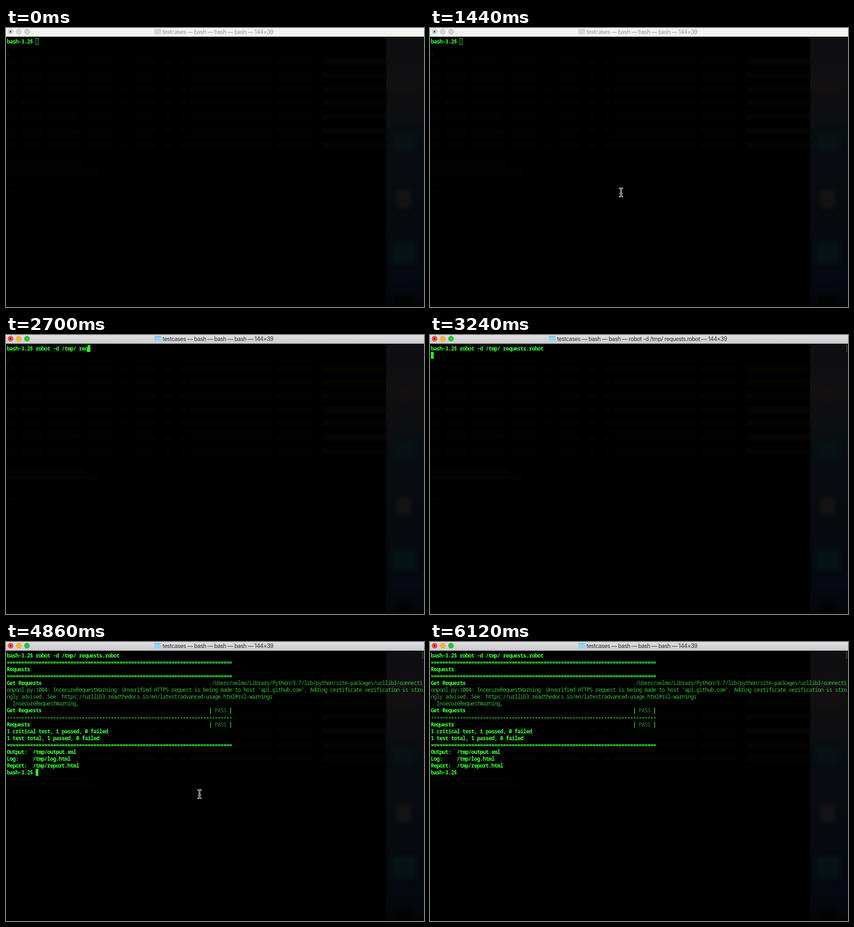
An HTML page for the animation above (6.21 s loop, 917x611 px).

```html
<!DOCTYPE html>
<html lang="en">
<head>
<meta charset="utf-8">
<title>Terminal session</title>
<style>
  html, body { margin: 0; width: 100%; height: 100%; overflow: hidden; background: #000; }
  #stage { position: relative; width: 917px; height: 611px; overflow: hidden; background: #000; }
  #stage * { position: absolute; box-sizing: border-box; }

  #bar { left: 0; top: 0; width: 917px; height: 19px; background: #f3f5ef; color: #96969a; }
  .active #bar { background: linear-gradient(#e0dfe2, #cacacc); color: #2d2d31; }
  #heading { left: 456px; top: 0; height: 17px; display: flex; gap: 3px; transform: translateX(-50%); }
  #stage #heading * { position: static; }
  #title { white-space: pre; font: 12.4px/17px Inter, "Liberation Sans", sans-serif; letter-spacing: -.53px; }
  #folder { margin-top: 2px; width: 15px; height: 12px; border-radius: 1px; background: #d5d7d3; }
  .active #folder { background: linear-gradient(#83c5e2 25%, #97d3ec 25%); }
  .light { top: 2px; width: 11.5px; height: 11.5px; border-radius: 50%; background: #d2d3d2; border: 1px solid #c2c3c2; }
  .active .light { background: var(--on); border-color: var(--rim); }
  #dot { left: 8px; top: 6px; width: 4px; height: 4px; border-radius: 50%; background: #4a4a4c; }
  .active #dot { background: #5c0906; }

  #side { left: 834px; top: 19px; width: 83px; height: 592px;
    background: linear-gradient(#0f0f12, #100f12 18%, #0d0e11 30%, #080d11 37%, #080b0f 50%, #070a0e 70%, #050910 90%, #040609); }
  .smudge { border-radius: 2px; filter: blur(1.5px); }
  .tile { filter: blur(4px); }

  #term { left: 1.7px; top: 22px; color: #3bff35; white-space: pre;
    font: 600 12px/15.06px "Noto Sans Mono", "DejaVu Sans Mono", monospace; font-stretch: condensed; }
  #term .row { left: 0; height: 15.06px; }
  #term .row span { position: static; }
  #term .dim { color: #35bd33; font-weight: 400; }
  #term .pass { color: #318d31; font-weight: 400; }
  #probe { visibility: hidden; }
  #cursor { width: 6.4px; height: 15px; background: #2cff25; }
  #stage:not(.active) #cursor { background: none; border: 1px solid #2ce826; }
  .mark { top: 24px; width: 3px; height: 12px; border: 1px solid #27752a; }
  #open { left: -1px; border-right: 0; }
  #close { left: 912px; border-left: 0; }
  #beam { left: -7px; top: -12px; width: 14px; height: 24px; overflow: visible; }
</style>
</head>
<body>
<div id="stage">
  <div id="side"></div>
  <div id="ghost"></div>
  <div id="bar">
    <div class="light" style="left:4px;--on:#fc4c43;--rim:#dc3c35"></div>
    <div class="light" style="left:22px;--on:#fdb52c;--rim:#dd9c25"></div>
    <div class="light" style="left:40px;--on:#29c23b;--rim:#20a52f"></div>
    <div id="dot"></div>
    <div id="heading"><div id="folder"></div><div id="title"></div></div>
  </div>
  <div id="term"><span id="probe"></span><div id="cursor"></div></div>
  <div class="mark" id="open"></div>
  <div class="mark" id="close"></div>
  <svg id="beam" viewBox="-7 -12 14 24" fill="none" stroke-linecap="round">
    <path stroke="#fff" stroke-width="3.2" d="M-3-9Q0-9 0-6Q0-9 3-9M0-6V6M-3 9Q0 9 0 6Q0 9 3 9M-1.5 2H1.5"/>
    <path stroke="#111" stroke-width="1.1" d="M-3-9Q0-9 0-6Q0-9 3-9M0-6V6M-3 9Q0 9 0 6Q0 9 3 9M-1.5 2H1.5"/>
  </svg>
</div>
<script>
const LOOP = 6210, STEP = 90;
const CELL = 6.333, ROW = 15.06;
const FOCUS = 1710, TYPE = 2070, TYPED = 3060, ENTER = 3150;
const HEAD = 3420, WARN = 3690, DONE = 3780, PROMPT = 4050;

const $ = id => document.getElementById(id);
const stage = $('stage'), term = $('term'), cursor = $('cursor'), beam = $('beam');

function add(parent, cls, style) {
  const el = document.createElement('div');
  el.className = cls;
  Object.assign(el.style, style);
  parent.append(el);
  return el;
}

function block(cls, x, y, w, h, background) {
  add($('ghost'), cls, { left: x + 'px', top: y + 'px', width: w + 'px', height: h + 'px', background });
}

// Barely visible desktop behind the translucent window.
const faint = '#010401';
const words = [[0, 22], [34, 45], [92, 68], [178, 58], [256, 10], [286, 46], [344, 23], [382, 16], [402, 182], [592, 84]];
for (let i = 0; i < 7; i++) {
  const y = 68 + i * 30.1;
  for (const [x, w] of words) block('smudge', x, y, w, 11, faint);
  block('smudge', 692, y - 1, 142, 14, '#040401');
}
block('smudge', 0, 49, 7, 14, '#020c02');
block('smudge', 0, 294, 172, 10, faint);
block('smudge', 0, 308, 203, 11, faint);
block('smudge', 8, 355, 20, 7, faint);
block('tile', 848, 112, 48, 32, '#131110');
block('tile', 846, 228, 52, 42, '#081114');
block('tile', 856, 354, 33, 41, '#141213');
block('tile', 846, 468, 54, 49, '#071214');
block('tile', 850, 586, 44, 25, '#020304');

// Fit the font's advance to the terminal grid.
const probe = $('probe');
probe.textContent = '0'.repeat(100);
term.style.letterSpacing = CELL - probe.getBoundingClientRect().width / 100 + 'px';
probe.remove();

const prompt = 'bash-3.2$ ';
const command = 'robot -d /tmp/ requests.robot';
const dim = s => `<span class="dim">${s}</span>`;
const pass = name => name.padEnd(70) + '| <span class="pass">PASS</span> |';
const rule = '='.repeat(78);

const lines = [
  prompt,
  rule,
  'Requests',
  rule,
  'Get Requests'.padEnd(70) + dim('./Users/velmo/Library/Python/3.7/lib/python/site-packages/urllib3/connecti'),
  dim("onpool.py:1004: InsecureRequestWarning: Unverified HTTPS request is being made to host 'api.github.com'. Adding certificate verification is stro"),
  dim('ngly advised. See: https://urllib3.readthedocs.io/en/latest/advanced-usage.html#ssl-warnings'),
  dim('  InsecureRequestWarning,'),
  pass('Get Requests'),
  '-'.repeat(78),
  pass('Requests'),
  '1 critical test, 1 passed, 0 failed',
  '1 test total, 1 passed, 0 failed',
  rule,
  'Output:  /tmp/output.xml',
  'Log:     /tmp/log.html',
  'Report:  /tmp/report.html',
  prompt
];
const rows = lines.map((html, i) => {
  const row = add(term, 'row', { top: i * ROW + 'px' });
  row.innerHTML = html;
  return row;
});

const show = (el, on) => { el.style.visibility = on ? 'visible' : 'hidden'; };
const ramp = (t, a, b) => Math.min(1, Math.max(0, (t - a) / (b - a)));
const ease = p => p * p * (3 - 2 * p);

function rowCount(t) {
  if (t < HEAD) return 1;
  if (t < WARN) return 4;
  if (t < DONE) return 8;
  return t < PROMPT ? 17 : 18;
}

// Pointer position, or null while it is hidden.
function pointer(t) {
  const glide = (a, b, p) => a.map((v, i) => v + (b[i] - v) * ease(p));
  if (t >= 990 && t < TYPE) return glide([560, 40], [419, 360], ramp(t, 990, 1350));
  if (t >= 4500 && t < 5130) return glide([419, 360], [424.5, 333], ramp(t, 4500, 4770));
  if (t >= 5130 && t < 5490) return glide([424.5, 333], [560, 30], ramp(t, 5130, 5490));
  return null;
}

function draw(t) {
  const running = t >= ENTER && t < PROMPT;
  stage.classList.toggle('active', t >= FOCUS);
  $('title').textContent = `testcases — bash — bash — ${running ? command : 'bash'} — 144×39`;

  const typed = Math.round(command.length * ramp(t, TYPE, TYPED));
  const count = rowCount(t);
  rows[0].textContent = prompt + command.slice(0, typed);
  rows.forEach((row, i) => show(row, i < count));

  const atPrompt = t >= PROMPT;
  const col = t < ENTER ? prompt.length + typed : atPrompt ? prompt.length : 0;
  const line = t < ENTER ? 0 : atPrompt ? count - 1 : count;
  cursor.style.left = col * CELL + 'px';
  cursor.style.top = line * ROW + 'px';
  show(cursor, !(t >= 5040 && t < 5540 || t >= 6030));

  show($('close'), t >= ENTER);
  show($('open'), t >= HEAD);

  const at = pointer(t);
  show(beam, at);
  if (at) beam.style.transform = `translate(${at[0]}px, ${at[1]}px)`;
}

const start = performance.now();
function tick() {
  const t = (performance.now() - start) % LOOP;
  draw(Math.floor(t / STEP) * STEP);
  requestAnimationFrame(tick);
}
draw(0);
requestAnimationFrame(tick);
</script>
</body>
</html>
```
